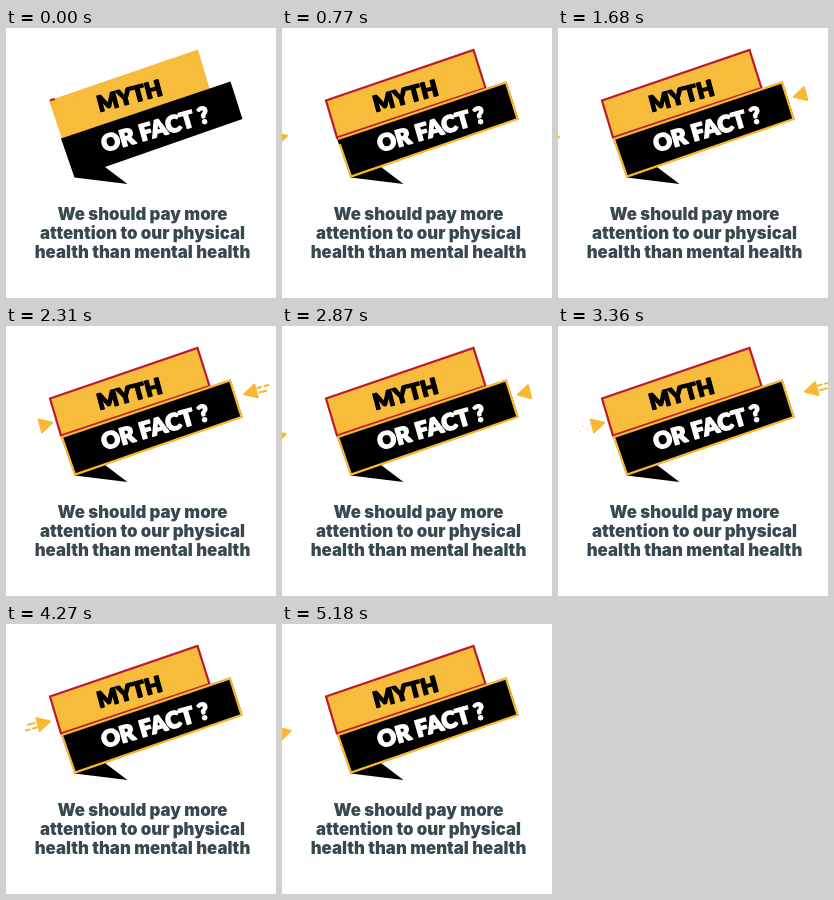
An HTML page that plays this animation: 270x270 px, repeating every 5.25 s.

```html
<!DOCTYPE html>
<html lang="en">
<head>
<meta charset="utf-8">
<title>Myth or fact</title>
<style>
  html, body { margin: 0; width: 100%; height: 100%; overflow: hidden; background: #fff; }
  svg { display: block; width: 100vw; height: 100vh; }
  text { text-anchor: middle; font-weight: 900; font-variant-ligatures: none; }
  .title { font-family: Lato, "Open Sans", sans-serif; stroke-width: 1.5; stroke-linejoin: round; }
  .body { font-family: Inter, "Open Sans", sans-serif; font-size: 16.8px; fill: #38484f; }
  .outline { fill: none; stroke-width: 2.2; }
  .arrow { fill: #fab832; stroke: #fab832; stroke-linejoin: round; stroke-linecap: round; }
</style>
</head>
<body>
<svg viewBox="0 0 270 270">
  <rect width="270" height="270" fill="#fff"/>
  <path d="M43 72.500L192 21.500L204 62L57 114Z" fill="#f8bc3c"/>
  <path id="red" class="outline" d="M44 72.500L191.500 22L203.500 60L55 109.500Z" stroke="#bd1a2e" pathLength="100"/>
  <path d="M55 110.500L224.500 53.500L236.500 91L99 139L121.500 156L68.500 149.500Z" fill="#000"/>
  <path id="yellow" class="outline" d="M56 111L224 54.500L235.500 91L69 148.500Z" stroke="#f9b832" pathLength="100"/>
  <g class="title">
    <text transform="translate(125.500 75.500) rotate(-15)" font-size="22" stroke="#000">MYTH</text>
    <text transform="translate(151.500 109) rotate(-16)" font-size="23" fill="#fff" stroke="#fff">OR FACT ?</text>
  </g>
  <g class="body">
    <text x="136.500" y="191.500">We should pay more</text>
    <text x="136.500" y="210.500">attention to our physical</text>
    <text x="136.500" y="229.500">health than mental health</text>
  </g>
  <g id="left" class="arrow"></g>
  <g id="right" class="arrow"></g>
</svg>
<script>
const LOOP = 5250, STEP = 70;
const FIRST = 560.5, PERIOD = 1084, RIGHT_DELAY = 210;
const $ = id => document.getElementById(id);
const clamp = v => Math.max(0, Math.min(1, v));

// [ms since the arrow starts, distance still to travel]
const SLIDE = [[0, 46], [35, 45], [210, 41], [280, 38], [350, 27], [420, 11.5], [455, 2.5], [490, 0]];
// [near end, far end, offset from the arrow's axis]
const DASHES = [[-16, -23, -2.4], [-15, -19, 2.6], [-22.4, -26.5, 2.6]];

function distanceLeft(ms) {
  const i = SLIDE.findIndex(([at]) => at > ms);
  if (i < 0) return 0;
  const [t0, d0] = SLIDE[i - 1], [t1, d1] = SLIDE[i];
  return d0 + (d1 - d0) * (ms - t0) / (t1 - t0);
}

function drawArrow(group, tipX, tipY, angle, ms) {
  if (ms < 0) { group.innerHTML = ""; return; }
  const phase = ms % PERIOD;
  const gone = clamp((phase - 470) / 175);
  const dashes = gone < 1 ? DASHES.map(([near, far, y]) =>
    `<path d="M${near + (far - near) * gone} ${y}H${far}" stroke-width="${2 - gone}"/>`).join("") : "";
  const shift = -distanceLeft(phase) / Math.cos(Math.PI / 12);
  group.setAttribute("transform", `translate(${tipX} ${tipY}) rotate(${angle}) translate(${shift} 0)`);
  group.innerHTML = `<path d="M-1 0L-13 -6.5V6.5Z" stroke-width="2.2"/>${dashes}`;
}

function trace(path, progress) {
  path.setAttribute("stroke-dasharray", progress < 1 ? `${progress * 100} 200` : "none");
}

function render(time) {
  const t = Math.floor((time % LOOP) / STEP) * STEP;
  trace($("red"), clamp((t + 8) / 630));
  trace($("yellow"), clamp(t / 780));
  drawArrow($("left"), 47, 96.5, -15, t - FIRST);
  drawArrow($("right"), 235, 69, 165, t - FIRST - RIGHT_DELAY);
}

const start = performance.now();
function tick() {
  render(performance.now() - start);
  requestAnimationFrame(tick);
}
tick();
</script>
</body>
</html>
```
